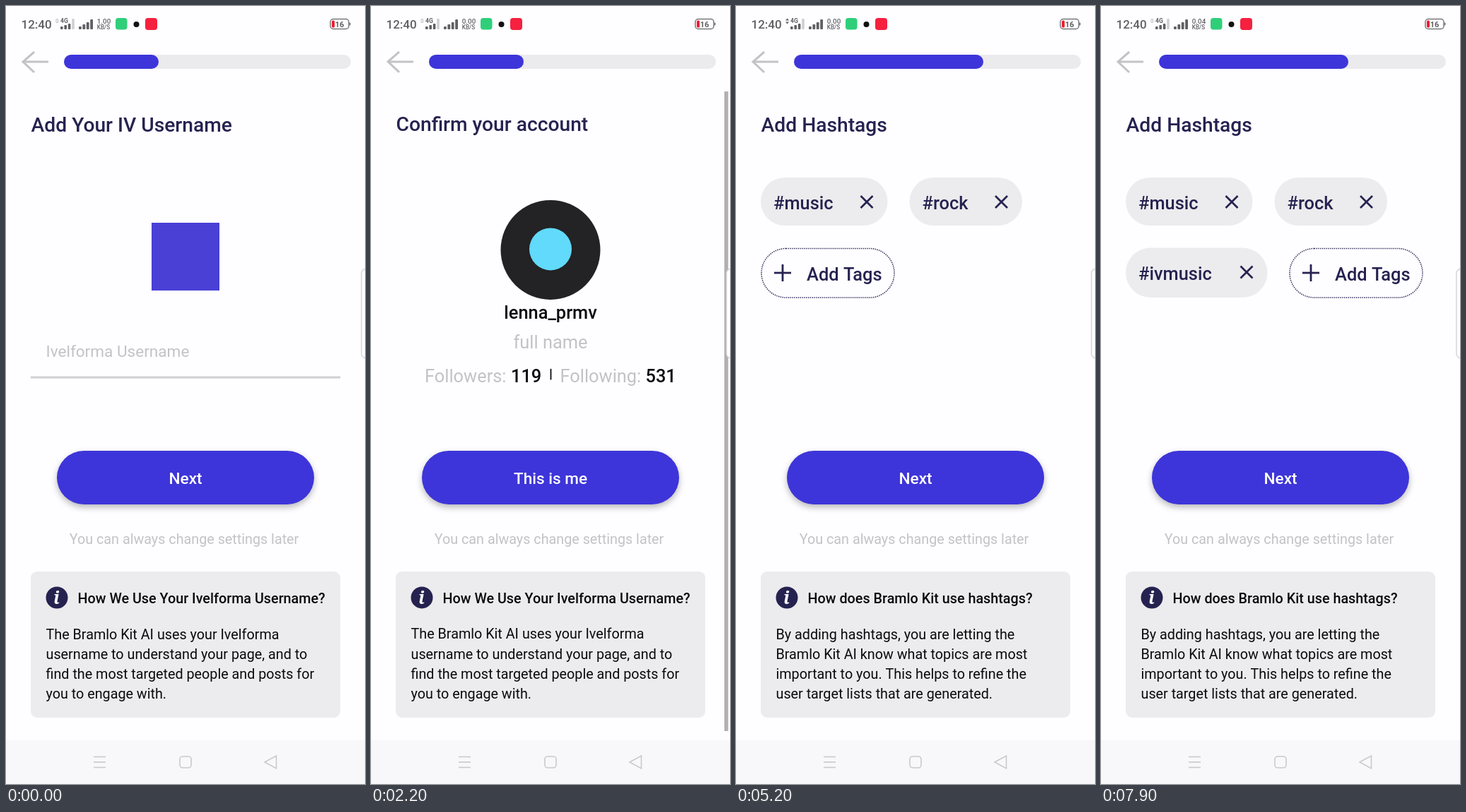
These frames come from a looping animation (508 px wide and 1102 px high, 8000 ms). An HTML page with a canvas:

```html
<!DOCTYPE html>
<html lang="en">
<head>
<meta charset="utf-8">
<title>Onboarding flow</title>
<style>
html, body { margin: 0; width: 100%; height: 100%; overflow: hidden; background: #fefdff; }
canvas { display: block; width: 100vw; height: 100vh; }
</style>
</head>
<body>
<canvas id="stage"></canvas>
<script>
const W = 508, H = 1102, TOP = 40, BOTTOM = 1040, LOOP = 8000, STEP = 100;
const BG = '#fefdff', BLUE = '#3d35d9', VIOLET = '#655fe0', NAVY = '#252250', PANEL = '#ecebed',
  MUTED = '#c3c3c6', BLACK = '#0b0b0d', YELLOW = '#ffd100', SKIN = '#f09f8e', BEAM = '#f1f0f2', STATUS = '#606064';
const SMALL = 19.76, BODY = 22.58, LARGE = 25.4, TITLE = 28.2;
const BRAND = 'Bramlo Kit', APP = 'Ivelforma';

const canvas = document.getElementById('stage');
const ctx = canvas.getContext('2d');
const clamp = v => Math.max(0, Math.min(1, v));

function text(str, x, y, size, color, weight = 400, align = 'left') {
  ctx.font = `${weight} ${size}px Roboto, sans-serif`;
  ctx.textAlign = align;
  ctx.fillStyle = color;
  ctx.fillText(str, x, y);
}

function box(x, y, w, h, r, color) {
  ctx.beginPath();
  ctx.roundRect(x, y, w, h, r);
  if (color) { ctx.fillStyle = color; ctx.fill(); }
}

function line(points, color, width, close = false) {
  ctx.beginPath();
  points.forEach(([x, y]) => ctx.lineTo(x, y));
  if (close) ctx.closePath();
  ctx.strokeStyle = color;
  ctx.lineWidth = width;
  ctx.stroke();
}

function oval(x, y, rx, ry, color, turn = 0) {
  ctx.beginPath();
  ctx.ellipse(x, y, rx, ry, turn, 0, Math.PI * 2);
  ctx.fillStyle = color;
  ctx.fill();
}

function shape(d, color) {
  ctx.fillStyle = color;
  ctx.fill(new Path2D(d));
}

function faded(alpha, draw) {
  ctx.save();
  ctx.globalAlpha *= alpha;
  draw();
  ctx.restore();
}

// Timing helpers
function ease(t) {
  if (t <= 0) return 0;
  if (t >= 1) return 1;
  // cubic-bezier(.2, 0, 0, 1)
  let lo = 0, hi = 1;
  for (let i = 0; i < 24; i++) {
    const u = (lo + hi) / 2;
    if (0.6 * u * (1 - u) ** 2 + u ** 3 < t) lo = u; else hi = u;
  }
  return 3 * lo * lo - 2 * lo ** 3;
}
const slide = (t, start) => ease((t - start) / 425);

function press(t, start, end) {
  if (t < start || t >= end) return 1;
  return 1 - 0.5 * Math.sin(Math.PI * (t - start + STEP) / (end - start + STEP));
}

const flashes = [[300, 900], [1200, 1600], [1800, 2600], [5800, 6600]];
function scrollAlpha(t) {
  const hit = flashes.find(([a, b]) => t >= a && t < b);
  return hit ? 0.3 * clamp((hit[1] - t) / 250) : 0;
}

// Shared parts
function backArrow() {
  line([[60, 79], [24, 79]], MUTED, 3);
  line([[40, 65], [24, 79], [40, 94]], MUTED, 3);
}

function plus(x, y, r) {
  line([[x - r, y], [x + r, y]], NAVY, 2.8);
  line([[x, y - r], [x, y + r]], NAVY, 2.8);
}

function form(t, o) {
  backArrow();
  box(82, 69, 406, 20, 10, '#ebeaec');
  box(82, 69, o.progress, 20, 10, BLUE);
  text(o.title, 35.5, 177.5, TITLE, NAVY, 500);

  faded(o.press, () => {
    ctx.save();
    ctx.shadowColor = 'rgba(0,0,0,.28)';
    ctx.shadowBlur = 10;
    ctx.shadowOffsetY = 4;
    box(72, 630, 364, 76, 38, BLUE);
    ctx.restore();
    text(o.button, 254, 677, BODY, '#fff', 500, 'center');
  });
  text('You can always change settings later', 252, 762, SMALL, MUTED, 400, 'center');

  box(35, 801, 438, 207, 9, PANEL);
  oval(72, 838, 15.5, 15.5, NAVY);
  ctx.font = 'italic 700 25px "Noto Serif", serif';
  ctx.textAlign = 'center';
  ctx.fillStyle = '#fff';
  ctx.fillText('i', 71.5, 847);
  text(o.question, 101.5, 846, SMALL, BLACK, 500);
  o.answer.forEach((s, i) => text(s, 56.5, 896.5 + i * 28.2, SMALL, BLACK));

  box(500, 121, 5.5, 906, 0, `rgba(0,0,0,${scrollAlpha(t)})`);
}

const accountInfo = {
  question: `How We Use Your ${APP} Username?`,
  answer: [`The ${BRAND} AI uses your ${APP}`, 'username to understand your page, and to',
    'find the most targeted people and posts for', 'you to engage with.']
};
const tagInfo = {
  question: `How does ${BRAND} use hashtags?`,
  answer: ['By adding hashtags, you are letting the', `${BRAND} AI know what topics are most`,
    'important to you. This helps to refine the', 'user target lists that are generated.']
};

// Pages
function usernamePage(t) {
  form(t, { ...accountInfo, progress: 134, title: 'Add Your IV Username', button: 'Next', press: press(t, 300, 500) });
  box(206, 307, 96, 96, 0, '#4a40d6');
  text(`${APP} Username`, 56.5, 496.5, BODY, MUTED);
  line([[35, 526], [473, 526]], '#d0cfd2', 3);
}

function confirmPage(t) {
  const dip = Math.min(press(t, 1200, 1600), press(t, 1800, 2100));
  form(t, { ...accountInfo, progress: 134, title: 'Confirm your account', button: 'This is me', press: dip });
  oval(254, 345.5, 70.5, 70.5, '#232224');
  oval(254, 344.5, 30, 30, '#61dafb');
  text('lenna_prmv', 254, 443.5, LARGE, BLACK, 500, 'center');
  text('full name', 254, 485, LARGE, MUTED, 400, 'center');
  text('Followers:', 76, 533.5, LARGE, MUTED);
  text('119', 198, 533.5, LARGE, BLACK, 500);
  line([[254.5, 514], [254.5, 529.5]], BLACK, 1.8);
  text('Following:', 267.5, 533.5, LARGE, MUTED);
  text('531', 388.5, 533.5, LARGE, BLACK, 500);
}

function searcher() {
  oval(263, 722, 175, 25, BEAM);
  shape('M307 616L329 682Q331 697 315 698L300 708L420 708Q402 706 394 692L341 592Z', BEAM);
  shape('M109 530Q135 510 160 510Q190 511 222 528L200 540Z', VIOLET);
  oval(96, 616.5, 9.5, 6, SKIN);
  box(70, 530, 120, 83, 0, YELLOW);
  shape('M238 543L256 532L262 546Q252 551 245 557Z', SKIN);
  shape('M257 533L272 530L274 544Q271 551 264 550Q258 549 257 540Z', SKIN);
  shape('M255 533Q262 517 275 521Q282 528 290 528Q288 538 276 537Q270 531 265 534L259 539Z', '#23215a');
  shape('M121 624C124 595 132 578 143 563C160 541 184 526 212 526C236 530 245 548 245 570C244 598 233 609 207 609L165 627Z', BLUE);
  shape('M121 622L163 626C172 640 185 641 196 643C222 652 232 675 228 694L224 716L211 715C212 695 212 675 186 668C175 690 150 708 120 715L118 704C140 696 152 680 149 664C130 660 118 645 121 622Z', '#23215a');
  shape('M113 704L120 706L118 715Q114 726 108 724Q104 722 109 711Z', BLUE);
  shape('M217 714L226 716Q236 720 236 725Q234 729 225 727L216 723Z', BLUE);
  shape('M160 612C160 575 178 540 200 540C218 540 226 557 217 578C212 590 205 602 207 606C222 616 250 614 280 611L283 627C250 636 218 643 196 643C172 642 160 634 160 612Z', VIOLET);
  line([[286, 632], [308, 608]], YELLOW, 8);
  shape('M281 614L292 613Q304 617 301 624Q294 630 283 627Z', SKIN);
  oval(319.5, 596, 16.5, 20.5, YELLOW, 0.65);
  oval(318.5, 596, 10, 13.5, '#ffe680', 0.65);
}

function workingPage() {
  text(BRAND, 187, 357, BODY, BLUE, 500, 'right');
  text('is working to find related', 192, 357, BODY, NAVY);
  text('hashtags for you', 254, 384, BODY, NAVY, 400, 'center');
  searcher();
}

function chip(label, x, y, w, h) {
  box(x, y, w, h, h / 2, PANEL);
  text(label, x + 18, y + 45, LARGE, NAVY, 500);
  const cx = x + w - 29.5, cy = y + 34.5, r = 8.5;
  line([[cx - r, cy - r], [cx + r, cy + r]], NAVY, 2.7);
  line([[cx - r, cy + r], [cx + r, cy - r]], NAVY, 2.7);
}

function addChip(x) {
  box(x, 343.5, 188, 69.5, 34.7);
  ctx.setLineDash([1.4, 1.4]);
  ctx.strokeStyle = NAVY;
  ctx.lineWidth = 1.5;
  ctx.stroke();
  ctx.setLineDash([]);
  plus(x + 30, 378, 12);
  text('Add Tags', x + 64, 388.5, LARGE, NAVY, 500);
}

function tagsPage(t) {
  form(t, { ...tagInfo, progress: 268, title: 'Add Hashtags', button: 'Next', press: 1 });
  chip('#music', 35, 243, 179.5, 68);
  chip('#rock', 245.5, 243, 159.5, 68);
  const added = t >= 6700;
  if (added) chip('#ivmusic', 35, 342.5, 200.5, 70.5);
  faded(press(t, 5800, 6200), () => addChip(added ? 267 : 36));
}

const results = ['#ivmusic', '#guitar', '#concert', '#drums', '#hiphop'];
function searchPage(t) {
  faded(press(t, 7400, 7600), backArrow);
  results.forEach((tag, i) => {
    const y = 152 + i * 75;
    text(tag, 35.5, y + 8, BODY, BLACK, 500);
    faded(i === 0 && t >= 6700 ? 0.35 : 1, () => {
      plus(364.5, y - 1, 11.5);
      text('Add Tag', 472, y + 8, BODY, MUTED, 400, 'right');
    });
  });
}

// Frame of the phone
function statusBar(t) {
  box(0, 0, W, TOP, 0, BG);
  text('12:40', 21.5, 32, 17, STATUS, 500);
  if (t >= 5200 && t < 5800) {
    shape('M70 20.5L72.5 17.5L75 20.5ZM70 22.5L72.5 25.5L75 22.5Z', STATUS);
  } else {
    box(71, 18.5, 2.5, 5, 0.5);
    ctx.strokeStyle = '#bbbbbe';
    ctx.lineWidth = 1;
    ctx.stroke();
  }
  text('4G', 77, 24, 8.5, STATUS, 700);
  [4, 6, 8, 15].forEach((h, i) => box(77 + i * 5.4, 33 - h, 3.6, h, 1, i < 3 ? STATUS : '#cfcfd2'));
  [4, 7, 10, 14].forEach((h, i) => box(103 + i * 5.4, 33 - h, 3.8, h, 1, STATUS));
  const rate = t < 1800 ? '1.00' : t < 6000 ? '0.00' : '0.04';
  text(rate, 138.5, 25, 9.8, STATUS, 500, 'center');
  text('KB/S', 138, 33, 8.2, STATUS, 500, 'center');
  box(155, 17, 16.5, 16.5, 4, '#2fcf7a');
  oval(184.5, 26, 4, 4, '#111');
  box(197, 17, 17, 17, 4, '#f5213f');
  box(459, 18.5, 26, 14, 4);
  ctx.strokeStyle = '#77777b';
  ctx.lineWidth = 1.5;
  ctx.stroke();
  box(461, 20.5, 4, 10, 1.5, '#ee1c2e');
  box(485.5, 23.5, 2, 4, 1, '#77777b');
  text('16', 472, 29.5, 11, STATUS, 700, 'center');
}

function navBar() {
  box(0, BOTTOM, W, H - BOTTOM, 0, '#f8f7f9');
  const gray = '#cac9cc';
  [1063.5, 1071, 1078.5].forEach(y => line([[124, y], [141, y]], gray, 1.6));
  box(246, 1063, 16, 16, 4);
  ctx.stroke();
  line([[366, 1071], [382.5, 1062], [382.5, 1080]], gray, 1.6, true);
}

function edgeHandle() {
  box(503, 372.5, 14, 126, 6, BG);
  ctx.strokeStyle = '#d3d3d6';
  ctx.lineWidth = 1.4;
  ctx.stroke();
}

function layer(page, t, top, shift) {
  ctx.save();
  ctx.beginPath();
  ctx.rect(0, top, W, BOTTOM - top);
  ctx.clip();
  ctx.fillStyle = BG;
  ctx.fillRect(0, top, W, BOTTOM - top);
  ctx.translate(0, shift);
  page(t);
  ctx.restore();
}

// The front page is uncovered from the bottom while the back one dims and lifts.
function reveal(back, front, p, t) {
  const range = BOTTOM - TOP;
  if (p < 1) {
    layer(back, t, TOP, -0.02 * range * p);
    ctx.fillStyle = `rgba(0,0,0,${0.1 * clamp(p / 0.36)})`;
    ctx.fillRect(0, TOP, W, range);
  }
  if (p > 0) layer(front, t, TOP + range * (1 - p), 0.041 * range * (1 - p));
}

function render(t) {
  if (t < 500) layer(usernamePage, t, TOP, 0);
  else if (t < 4500) reveal(confirmPage, workingPage, slide(t, 2190), t);
  else if (t < 5800) reveal(workingPage, tagsPage, slide(t, 4561), t);
  else reveal(tagsPage, searchPage, slide(t, 6189) - slide(t, 7470), t);
  statusBar(t);
  navBar();
  edgeHandle();
}

const origin = performance.now();
function tick() {
  const dpr = window.devicePixelRatio || 1;
  const w = Math.round(innerWidth * dpr), h = Math.round(innerHeight * dpr);
  if (canvas.width !== w || canvas.height !== h) { canvas.width = w; canvas.height = h; }
  ctx.setTransform(w / W, 0, 0, h / H, 0, 0);
  const t = (performance.now() - origin) % LOOP;
  render(Math.floor(t / STEP) * STEP);
  requestAnimationFrame(tick);
}
tick();
</script>
</body>
</html>
```
